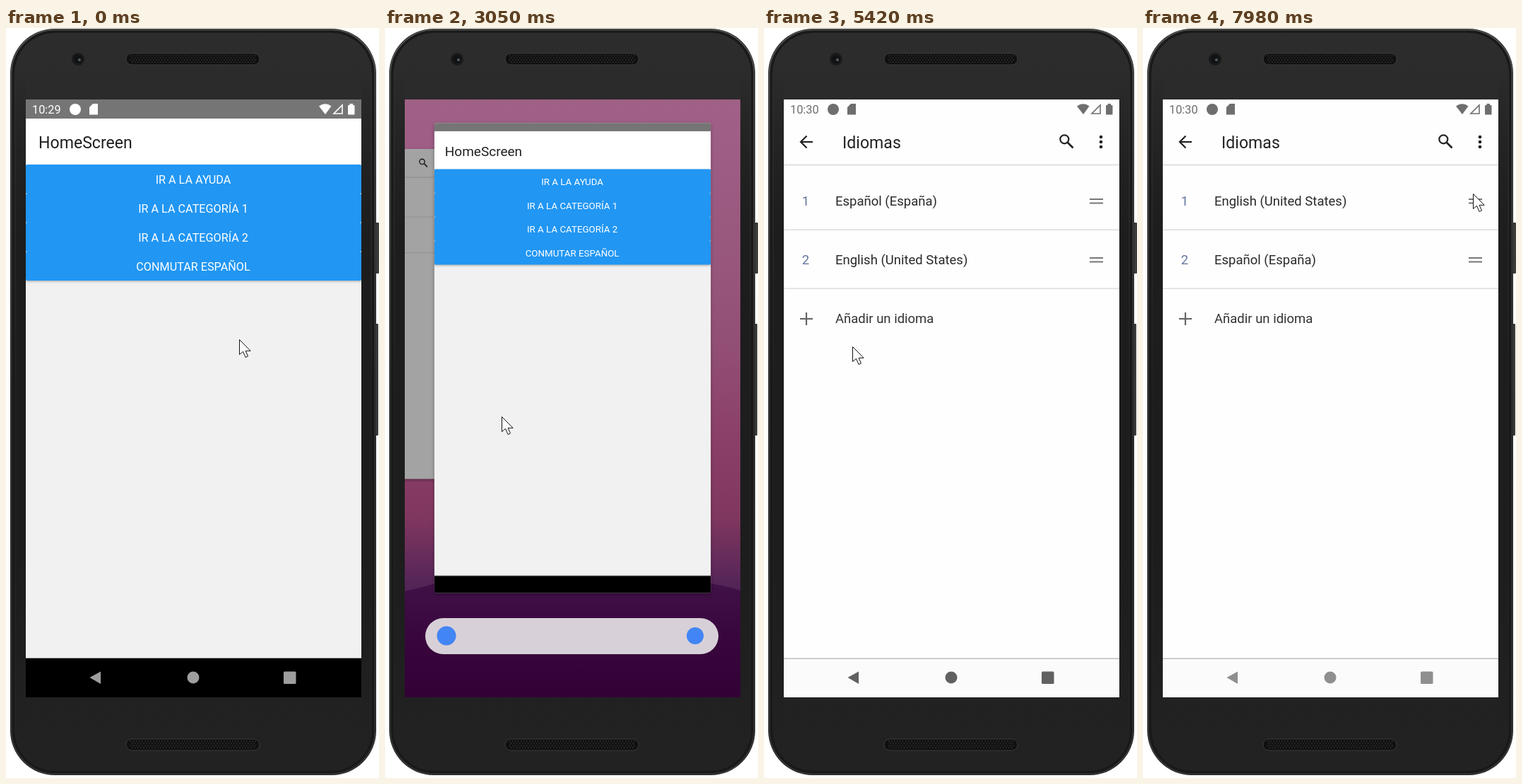
An HTML page with a canvas that plays this animation: 528x1060 px, repeating every 8000 ms.

```html
<!DOCTYPE html>
<html lang="es">
<head>
<meta charset="utf-8">
<title>Idiomas</title>
<style>
html, body { margin: 0; width: 100%; height: 100%; overflow: hidden; background: #fff; }
canvas { display: block; }
</style>
</head>
<body>
<canvas id="stage" width="528" height="1060"></canvas>
<script>
const LOOP = 8000;
const SCREEN = { x: 28, y: 101, w: 475, h: 845 };
const MID = 265.5, TOP = 128, BOTTOM = 891, RIGHT = 503;
const stage = document.getElementById('stage');
let g = stage.getContext('2d');

const mix = (a, b, k) => a + (b - a) * k;
const part = (t, a, b) => Math.min(1, Math.max(0, (t - a) / (b - a)));
const ease = k => k * k * (3 - 2 * k);
const ramp = (t, a, b) => ease(part(t, a, b));

// Each key is [time, ...values]; returns eased values at t.
function track(keys, t) {
  let i = 0;
  while (i < keys.length - 2 && t >= keys[i + 1][0]) i++;
  const [a, b] = [keys[i], keys[i + 1]];
  const k = ramp(t, a[0], b[0]);
  return a.slice(1).map((v, n) => mix(v, b[n + 1], k));
}

const POINTER = [
  [80, 330, 440], [830, 293, 333], [930, 293, 333], [1180, 360, 798],
  [1410, 360, 798], [1620, 376, 878], [1850, 397, 909], [2250, 397, 909],
  [3050, 165, 549], [3760, 79, 439], [4400, 79, 439], [5040, 125, 450],
  [5420, 125, 450], [6210, 447, 329], [6240, 447, 329], [6340, 452, 329],
  [7010, 452, 329], [7130, 456, 370], [7420, 463, 241], [7660, 467, 224],
  [7890, 467, 224], [7980, 467, 234]
];
const DRAG = [[7010, 0], [7130, 41], [7420, -88], [7600, -83]];

function rect(x, y, w, h, fill) {
  g.fillStyle = fill;
  g.fillRect(x, y, w, h);
}
function round(x, y, w, h, r, fill) {
  g.beginPath();
  g.roundRect(x, y, w, h, r);
  if (fill) { g.fillStyle = fill; g.fill(); }
}
function disc(x, y, r, fill) {
  g.beginPath();
  g.arc(x, y, r, 0, Math.PI * 2);
  g.fillStyle = fill;
  g.fill();
}
function path(pts, close) {
  g.beginPath();
  for (let i = 0; i < pts.length; i += 2) g.lineTo(pts[i], pts[i + 1]);
  if (close) g.closePath();
}
function fillPath(pts, fill) {
  path(pts, true);
  g.fillStyle = fill;
  g.fill();
}
function line(pts, color, width) {
  path(pts);
  g.strokeStyle = color;
  g.lineWidth = width;
  g.stroke();
}
function text(s, x, y, size, fill, align = 'left') {
  g.font = size + 'px Roboto, sans-serif';
  g.textAlign = align;
  g.fillStyle = fill;
  g.fillText(s, x, y);
}
function shade(x0, y0, x1, y1, ...colors) {
  const grad = g.createLinearGradient(x0, y0, x1, y1);
  colors.forEach((c, i) => grad.addColorStop(i / (colors.length - 1), c));
  return grad;
}
function shadow(blur, dy, color) {
  g.shadowBlur = blur;
  g.shadowOffsetY = dy;
  g.shadowColor = color;
}
const noShadow = () => shadow(0, 0, 'transparent');

function speaker(y) {
  round(170, y, 189, 16, 8, '#101010');
  g.strokeStyle = '#3a3a3a';
  g.lineWidth = 1;
  g.stroke();
  for (let row = 0; row < 4; row++)
    for (let x = 176 + (row % 2) * 2; x < 354; x += 4)
      rect(x, y + 2.5 + row * 3, 1.6, 1.6, '#333');
}

function phone() {
  rect(0, 0, 528, 1060, '#fff');
  round(521, 275, 7, 72, 1, '#3c3c3c');
  round(521, 418, 6, 158, 1, '#3c3c3c');
  round(6, 1, 518, 1055, 63, '#1b1b1b');
  round(7.5, 2.5, 515, 1052, 62);
  g.strokeStyle = shade(0, 0, 0, 1056, '#585858', '#383838', '#3a3a3a');
  g.lineWidth = 1.5;
  g.stroke();
  round(11, 6, 508, 1045, 59, shade(0, 0, 0, 1056, '#2d2d2d', '#1f1f1f', '#222'));
  g.strokeStyle = '#141414';
  g.lineWidth = 1;
  g.stroke();
  const edge = shade(0, 60, 0, 990, 'rgba(29,29,29,0)', '#1d1d1d', '#1d1d1d', '#1d1d1d', 'rgba(29,29,29,0)');
  rect(14, 60, 14, 930, edge);
  rect(503, 60, 13, 930, edge);
  speaker(36);
  speaker(1005);
  disc(102, 44, 9, '#1a1a1a');
  disc(102, 44, 6, '#101214');
  disc(104, 45, 2, '#555d60');
}

function statusBar(clock, color) {
  text(clock, 37, 121, 16.3, color);
  disc(98, 115, 8, color);
  fillPath([118, 112, 123, 107, 130, 107, 130, 122.5, 118, 122.5], color);
  g.beginPath();
  g.moveTo(452, 122);
  g.lineTo(443, 110.5);
  g.quadraticCurveTo(452, 104, 460.5, 110.5);
  g.fillStyle = color;
  g.fill();
  path([464, 121, 476, 121, 476, 109], true);
  g.strokeStyle = color;
  g.lineWidth = 1.6;
  g.stroke();
  round(484, 109, 9.5, 13.5, 1, color);
  rect(486.5, 107, 4.5, 3, color);
}

function navIcons(color) {
  fillPath([118.5, 918, 134, 909.5, 134, 927], color);
  disc(265, 918, 8.5, color);
  round(393, 909.5, 17.5, 17.5, 1.5, color);
}

function homeBody() {
  rect(28, 101, 475, 27, '#757575');
  rect(28, TOP, 475, 65, '#fff');
  rect(28, 193, 475, 698, '#f1f1f1');
  text('HomeScreen', 46, 170, 23.1, '#202022');
  const labels = ['IR A LA AYUDA', 'IR A LA CATEGORÍA 1', 'IR A LA CATEGORÍA 2', 'CONMUTAR ESPAÑOL'];
  shadow(3, 1.5, 'rgba(0,0,0,.25)');
  round(28, 193, 475, 164, 2, '#2196f3');
  noShadow();
  labels.forEach((s, i) => {
    const y = 193 + 41 * i;
    if (i) [28, RIGHT - 1.5].forEach(x => rect(x, y - 0.5, 1.5, 1.5, '#b9d9f2'));
    text(s, 265, y + 27, 16.2, '#fff', 'center');
  });
  rect(28, 890, 475, 1, '#9a9a9a');
  rect(28, BOTTOM, 475, 55, '#000');
}

// p: 0 is full screen, 1 is the small card in the overview.
function homeCard(p, cx) {
  const s = 1 - 0.373 * p;
  const top = TOP - 27 * (1 - p), end = BOTTOM + 55 * (1 - p);
  g.save();
  g.translate(cx, TOP + 38 * p);
  g.scale(s, s);
  g.translate(-MID, -TOP);
  shadow(5, 2, 'rgba(0,0,0,.35)');
  round(28, top, 475, end - top, 8 * p * p / s, '#f1f1f1');
  noShadow();
  g.clip();
  homeBody();
  g.restore();
}

function handle(y) {
  rect(461, y - 4, 19, 2, '#777');
  rect(461, y + 1.5, 19, 2, '#777');
}

function row(num, label, y, lift = 0) {
  if (lift) shadow(6 * lift, 2, `rgba(0,0,0,${0.4 * lift})`);
  rect(28, y - 41.5, 475, 83, '#fefefe');
  noShadow();
  rect(28, y + 39.5, 475, 1.5, '#dedede');
  text(num, 59, y + 6, 18.5, '#64759f', 'center');
  text(label, 101, y + 6, 18.5, '#2a2a2a');
  handle(y);
}

function settingsBody(t) {
  const ink = '#222';
  rect(28, TOP, 475, 763, '#fefefe');
  line([69, 161, 52, 161], ink, 2.2);
  line([60.5, 152.5, 52, 161, 60.5, 169.5], ink, 2.2);
  text('Idiomas', 111, 170, 23.1, ink);
  g.beginPath();
  g.arc(425.3, 157.3, 6, 0, Math.PI * 2);
  g.strokeStyle = ink;
  g.lineWidth = 2.2;
  g.stroke();
  line([429.5, 161.5, 437.5, 169.5], ink, 2.6);
  [154, 161, 168].forEach(y => disc(477, y, 2.3, ink));
  rect(28, 192.5, 475, 2, '#e0e0e0');

  line([51, 411, 69, 411], '#666', 2.2);
  line([60, 402, 60, 420], '#666', 2.2);
  text('Añadir un idioma', 101, 417, 18.5, '#333');

  const done = t >= 7600;
  const lift = part(t, 6400, 6640) * (1 - part(t, 7480, 7650));
  row(done ? 2 : 1, 'Español (España)', 245 + 83 * ramp(t, 7250, 7440));
  row(done ? 1 : 2, 'English (United States)', 328 + track(DRAG, t)[0], lift);
}

function sideCard(t) {
  const open = part(t, 4260, 4310);
  const k = part(t, 3880, 4010);
  const s = open ? mix(0.632, 1, open) : mix(0.611, 0.632, k);
  const right = open ? mix(122, RIGHT, open) : mix(100, 122, k);
  const y = open ? mix(170, TOP, open) : mix(171, 170, k);
  g.save();
  g.translate(right, y);
  g.scale(s, s);
  g.translate(-RIGHT, -TOP);
  shadow(5, 2, 'rgba(0,0,0,.4)');
  round(28, TOP, 475, 763, 12 * k * (1 - open), '#bbb');
  noShadow();
  g.clip();
  settingsBody(0);
  rect(28, TOP, 475, 763, `rgba(0,0,0,${mix(0.36, 0.27, k) * (1 - open)})`);
  g.restore();
}

function wallpaper() {
  rect(28, 101, 475, 845, shade(0, 101, 0, 810,
    '#a06087', '#9c5b82', '#98567c', '#924e75', '#8b4069', '#80375f', '#4a2056'));
  g.beginPath();
  g.moveTo(28, 796);
  g.quadraticCurveTo(80, 785, 122, 767);
  g.quadraticCurveTo(180, 772, 250, 789);
  g.quadraticCurveTo(330, 798, 383, 781);
  g.quadraticCurveTo(440, 776, 503, 795);
  g.lineTo(503, 946);
  g.lineTo(28, 946);
  g.fillStyle = shade(0, 765, 0, 946, '#421449', '#39073e', '#330036');
  g.fill();
  disc(176, 755, 29, '#1a73e8');
  disc(353, 755, 29, '#dd5144');
  round(57, 834, 415, 51, 25.5, '#d8d0d8');
  disc(87, 859, 13.5, '#4285f4');
  disc(439, 859, 12, '#4285f4');
}

function overview(t) {
  const p = ramp(t, 2745, 3380);
  const cx = mix(MID, 255, part(t, 3880, 4010));
  const launching = t >= 3880;
  wallpaper();
  if (!launching) sideCard(t);
  homeCard(p, cx);
  const pop = ramp(t, 3350, 3550);
  if (pop) disc(cx - 1, 166, 25 * pop, '#1a73e8');
  if (launching) sideCard(t);
  if (t >= 3350) statusBar('10:30', '#fff');
  g.globalAlpha = part(t, 3350, 3550) * (1 - part(t, 3880, 3950));
  navIcons('#fff');
  g.globalAlpha = 1;
}

function home(t) {
  homeBody();
  statusBar(t < 1000 ? '10:29' : '10:30', '#fff');
  const grow = ramp(t, 1880, 2080), fade = 1 - part(t, 2060, 2240);
  if (grow && fade) {
    g.save();
    g.beginPath();
    g.rect(28, BOTTOM, 475, 55);
    g.clip();
    round(401 - 60 * grow, 918 - 27 * grow, 120 * grow, 54 * grow, 27 * grow, `rgba(255,255,255,${0.2 * fade})`);
    g.restore();
  }
  navIcons('#9e9e9e');
}

function settings(t) {
  rect(28, 101, 475, 27, '#fefefe');
  settingsBody(t);
  statusBar('10:30', '#6e6e6e');
  rect(28, 890, 475, 1.5, '#dedede');
  rect(28, 891.5, 475, 54.5, '#fbfbfb');
  const v = Math.round(mix(97, 143, part(t, 5420, 5600)));
  navIcons(`rgb(${v},${v},${v})`);
}

function pointer(t) {
  const [x, y] = track(POINTER, t);
  g.save();
  g.translate(Math.round(x) + 0.5, Math.round(y) + 0.5);
  path([0, 0, 0, 21, 5, 16.8, 8.6, 25, 12, 23.4, 8.6, 15.8, 15.6, 15.8], true);
  g.fillStyle = '#fff';
  g.fill();
  g.strokeStyle = '#111';
  g.lineWidth = 1;
  g.stroke();
  g.restore();
}

const shell = document.createElement('canvas');
shell.width = 528;
shell.height = 1060;
const view = g;
g = shell.getContext('2d');
phone();
g = view;

function frame() {
  const t = performance.now() % LOOP;
  g.drawImage(shell, 0, 0);
  g.save();
  g.beginPath();
  g.rect(SCREEN.x, SCREEN.y, SCREEN.w, SCREEN.h);
  g.clip();
  if (t < 2745) home(t);
  else if (t < 4305) overview(t);
  else settings(t);
  pointer(t);
  g.restore();
  requestAnimationFrame(frame);
}
frame();
</script>
</body>
</html>
```
